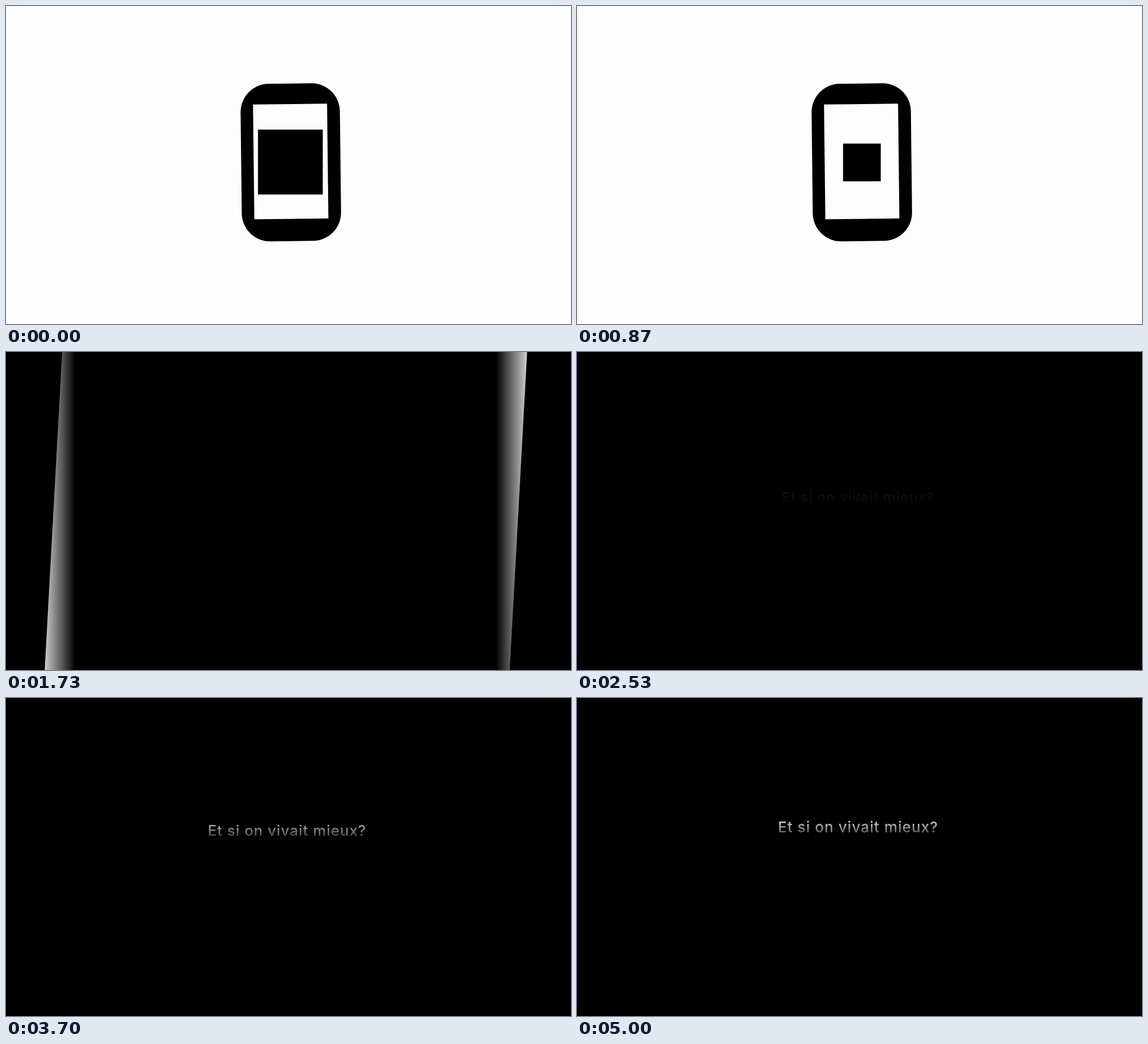
An HTML page for the animation above (5.03 s loop, 998 by 561 pixels).

```html
<!DOCTYPE html>
<html lang="fr">
<head>
<meta charset="utf-8">
<title>Et si on vivait mieux?</title>
<style>
  html, body { margin: 0; width: 100%; height: 100%; overflow: hidden; background: #fdfdfd; }
  svg { display: block; width: 100vw; height: 100vh; }
  text { font: 500 26.2px Inter, sans-serif; letter-spacing: 1px; text-anchor: middle; }
</style>
</head>
<body>
<svg viewBox="0 0 998 561" preserveAspectRatio="none">
  <defs>
    <linearGradient id="edge">
      <stop offset="0" stop-opacity="0"/>
      <stop id="fadeIn" stop-opacity="1"/>
      <stop id="fadeOut" stop-opacity="1"/>
      <stop offset="1" stop-opacity="0"/>
    </linearGradient>
    <linearGradient id="shine" gradientUnits="userSpaceOnUse" x1="0" x2="0" y1="-20" y2="0">
      <stop offset="0" stop-color="#dededa"/>
      <stop offset="1" stop-color="#646462"/>
    </linearGradient>
  </defs>
  <rect width="998" height="561" fill="#fdfdfd"/>
  <path id="frame" d="M-264-501H264V284H-264ZM-233-470V253H233V-470Z" fill-rule="evenodd"/>
  <g id="phone">
    <rect x="-87.7" y="-139" width="175.4" height="278" rx="50"/>
    <rect x="-65.6" y="-102.8" width="130.8" height="202.6" fill="#fdfdfd"/>
  </g>
  <rect id="square"/>
  <rect id="night" width="998" height="561"/>
  <text id="line" fill="url(#shine)">Et si on vivait mieux?</text>
</svg>
<script>
const LOOP = 5030;
const GROW = 1533, ZOOM = 1600, NIGHT = 1775, TEXT = 2100;
const $ = id => document.getElementById(id);
const set = (id, attrs) => {
  for (const [name, value] of Object.entries(attrs)) $(id).setAttribute(name, value);
};
const show = (id, on) => set(id, { visibility: on ? 'visible' : 'hidden' });

// Slow start, quick middle and a long settling tail.
const rise = [[2100, 0], [2670, .14], [3170, .59], [3730, .79], [4270, .91], [4800, .965], [5030, .98]];

function along(points, t) {
  let i = 0;
  while (i < points.length - 2 && t > points[i + 1][0]) i++;
  const [[t0, v0], [t1, v1]] = [points[i], points[i + 1]];
  const slope = k => {
    if (k === 0) return 0;
    const a = points[k - 1], b = points[Math.min(k + 1, points.length - 1)];
    return (b[1] - a[1]) / (b[0] - a[0]);
  };
  const d = t1 - t0, u = (t - t0) / d, w = 1 - u;
  return w * w * (1 + 2 * u) * v0 + u * u * (3 - 2 * u) * v1
    + u * w * w * d * slope(i) - u * u * w * d * slope(i + 1);
}

function drawFrame(t) {
  const scale = (t - 570) / 130;
  show('frame', scale > 0 && scale < 2.5);
  set('frame', { transform: `translate(504 276) scale(${Math.max(scale, 0)})` });
}

function drawPhone(t) {
  const k = (Math.max(t - ZOOM, 0) / 131) ** 2;
  show('phone', t < NIGHT);
  set('phone', {
    transform: `translate(${503.1 - 7.2 * k} ${275.8 + k}) rotate(${-.66 + 3.8 * k}) scale(${1 + 5.27 * k})`
  });
}

function drawSquare(t) {
  const grow = Math.max(t - GROW, 0);
  const half = (114.5 - .055 * Math.min(t, GROW)) / 2 + .00995 * grow * grow;
  const blur = .17 * grow;
  const reach = half + blur;
  const x = 502.3 + .0011 * Math.min(t, GROW) - 10 * (grow / 197) ** 2;
  const y = 275.3 + .0008 * Math.min(t, GROW);
  show('square', t < NIGHT);
  set('square', {
    x: x - reach, y: y - half, width: 2 * reach, height: 2 * half,
    fill: blur ? 'url(#edge)' : '#000'
  });
  set('fadeIn', { offset: blur / reach });
  set('fadeOut', { offset: 1 - blur / reach });
}

function drawText(t) {
  const p = along(rise, Math.max(t, TEXT));
  show('line', t > TEXT);
  set('line', {
    transform: `translate(496.5 ${267.5 - 31.5 * p}) scale(${.945 + .056 * p})`,
    opacity: p
  });
}

function draw(now) {
  const t = now % LOOP;
  drawFrame(t);
  drawPhone(t);
  drawSquare(t);
  show('night', t >= NIGHT);
  drawText(t);
}

const start = performance.now();
function tick() {
  draw(performance.now() - start);
  requestAnimationFrame(tick);
}
tick();
</script>
</body>
</html>
```
